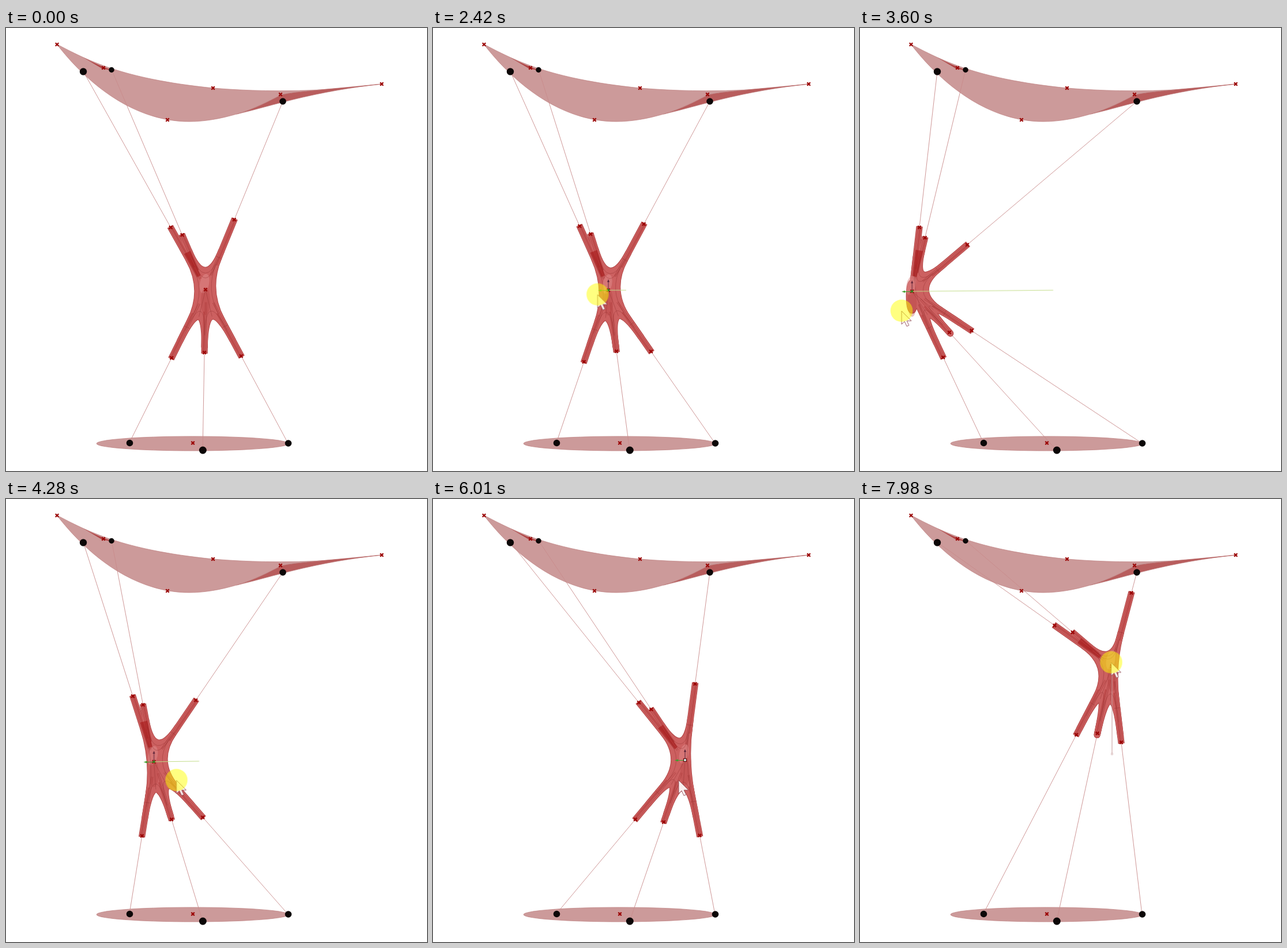
Animation, 730 px wide and 767 px high, one loop 8000 ms. Source, as an HTML page without scripts:

```html
<!DOCTYPE html>
<html lang="en">
<head>
<meta charset="utf-8">
<title>Branching node</title>
<style>
@property --cx { syntax: "<number>"; inherits: true; initial-value: 346; }
@property --cy { syntax: "<number>"; inherits: true; initial-value: 453; }

html, body { margin: 0; width: 100%; height: 100%; overflow: hidden; background: #fff; }
svg { display: block; width: 730px; height: 767px; animation: drag 8s linear infinite; }
path { vector-effect: non-scaling-stroke; }

/* Position of the draggable centre */
@keyframes drag {
  0%, 21.6% { --cx: 346; --cy: 453; }
  31.1% { --cx: 300; --cy: 454; }
  36.25% { --cx: 219; --cy: 455; }
  41% { --cx: 92; --cy: 456; }
  48% { --cx: 89; --cy: 456; }
  51.75% { --cx: 135; --cy: 456; }
  53.5% { --cx: 256; --cy: 455; }
  57% { --cx: 410; --cy: 452; }
  64% { --cx: 482; --cy: 451; }
  66.5% { --cx: 488; --cy: 451; }
  69% { --cx: 474; --cy: 451; }
  73.4%, 85% { --cx: 437; --cy: 452; }
  90% { --cx: 437; --cy: 405; }
  95% { --cx: 437; --cy: 335; }
  100% { --cx: 437; --cy: 287; }
}

/* Anchors: place, limb length and how it varies with the centre */
.tl { --x: 134; --y: 75;  --n: 123.5; --kx: .047; --ky: .036; }
.tm { --x: 183; --y: 72;  --n: 103;   --kx: .03;  --ky: .097; }
.tr { --x: 480; --y: 127; --n: 131;   --kx: .023; --ky: .012; }
.bl { --x: 214; --y: 718; --n: 132;   --kx: .022; --ky: 0; }
.bm { --x: 341; --y: 731; --n: 109;   --kx: .05;  --ky: -.035; }
.br { --x: 489; --y: 719; --n: 130.6; --kx: .027; --ky: 0; }

.p {
  --dx: calc(var(--x) - var(--cx));
  --dy: calc(var(--y) - var(--cy));
  --ux: cos(atan2(var(--dy), var(--dx)));
  --uy: sin(atan2(var(--dy), var(--dx)));
  --l: calc(var(--n) + var(--kx) * (var(--cx) - 346) + var(--ky) * (var(--cy) - 453));
}
.string {
  transform: matrix(var(--dx), var(--dy), calc(0 - var(--dy)), var(--dx), var(--cx), var(--cy));
  fill: none; stroke: #c98c8c; stroke-width: .9;
}
.limb {
  transform: matrix(calc(var(--l) * var(--ux)), calc(var(--l) * var(--uy)),
    calc(0 - var(--uy)), var(--ux), var(--cx), var(--cy));
  fill: none;
}
.end {
  transform: translate(calc((var(--cx) + var(--l) * var(--ux)) * 1px),
    calc((var(--cy) + var(--l) * var(--uy)) * 1px));
}
/* Skin between two limbs, curved towards the centre */
.web {
  --vx: cos(atan2(var(--y2) - var(--cy), var(--x2) - var(--cx)));
  --vy: sin(atan2(var(--y2) - var(--cy), var(--x2) - var(--cx)));
  --r: calc(var(--t) + var(--kt, 0) * (var(--cy) - 453));
  transform: matrix(calc(var(--r) * var(--ux)), calc(var(--r) * var(--uy)),
    calc(var(--r) * var(--vx)), calc(var(--r) * var(--vy)), var(--cx), var(--cy));
}
.top { --t: 73; --kt: .13; }
.side { --t: 60; }
.low { --t: 99; --kt: -.14; }
.core { transform: translate(calc(var(--cx) * 1px), calc(var(--cy) * 1px)); }

.rim { --w: 11.2px; color: #ad4040; }
.skin { --w: 9.6px; color: #cc6060; }
.rim, .skin { stroke: currentColor; fill: currentColor; stroke-width: var(--w); stroke-linejoin: round; }
.seam { stroke: #a63636; stroke-width: .7; }
.shade { stroke: #bd4a4a; stroke-width: 2.6; }
.mesh { fill: none; stroke: #8e2c2c; stroke-width: .6; opacity: .65; }
.fold { fill: #a30c0c; stroke: #a30c0c; stroke-width: 4; opacity: .5; }
.x { stroke: #9b0505; stroke-width: 2.3; fill: none; }
.ball { fill: #0c0707; }

.axis {
  transform: matrix(calc(var(--cx) - 335), calc(var(--cy) - 454),
    calc(454 - var(--cy)), calc(var(--cx) - 335), 335, 454);
  stroke: #c3dc8a; animation: sideways 8s step-end infinite;
}
.lift {
  transform: matrix(1, 0, 0, calc(441 - var(--cy)), 437, var(--cy));
  stroke: #c59a9a;
}
.rise { animation: upward 8s step-end infinite; }
.gumball { animation: picked 8s step-end infinite; }
.rest { animation: idle 8s step-end infinite; }
.halo { fill: #ff0; opacity: .5; animation: press 8s step-end infinite; }
.cursor { animation: point 8s linear infinite; }
.arrow { fill: #fff; fill-opacity: .9; stroke: #8f4650; stroke-width: .9; }

@keyframes sideways { 0% { opacity: 0; } 21.6% { opacity: 1; } 73.4% { opacity: 0; } }
@keyframes upward { 0% { opacity: 0; } 85% { opacity: 1; } }
@keyframes picked { 0% { opacity: 0; } 20% { opacity: 1; } 85% { opacity: 0; } }
@keyframes idle { 0% { opacity: 0; } 20% { opacity: 1; } 21.6% { opacity: 0; } 73.4% { opacity: 1; } 85% { opacity: 0; } }
@keyframes press { 0% { opacity: 0; } 21.6% { opacity: .5; } 73.4% { opacity: 0; } 84.5% { opacity: .5; } }
@keyframes point {
  0%, 10.86% { transform: translate(426px, 398px); opacity: 0; }
  10.87% { transform: translate(426px, 398px); opacity: 1; }
  20.5%, 21.6% { transform: translate(336px, 450px); }
  30.5% { transform: translate(284px, 462px); }
  36.25% { transform: translate(184px, 474px); }
  40.5% { transform: translate(74px, 490px); }
  47.5% { transform: translate(71px, 490px); }
  51.2% { transform: translate(135px, 489px); }
  53.5% { transform: translate(295px, 487px); }
  56.5% { transform: translate(415px, 490px); }
  64% { transform: translate(476px, 491px); }
  66% { transform: translate(479px, 491px); }
  68.5% { transform: translate(464px, 489px); }
  73.4%, 75.5% { transform: translate(426px, 487px); }
  82%, 84.5% { transform: translate(436px, 444px); }
  90% { transform: translate(436px, 398px); }
  95% { transform: translate(436px, 328px); }
  100% { transform: translate(435.5px, 281px); opacity: 1; }
}
</style>
</head>
<body>
<svg viewBox="0 0 730 767">
  <defs>
    <path id="x" class="x" d="M-2.7-2.7 2.7 2.7M-2.7 2.7 2.7-2.7"/>
    <g id="body">
      <path class="p limb tl" d="M0 0H1.015"/>
      <path class="p limb tm" d="M0 0H1.015"/>
      <path class="p limb tr" d="M0 0H1.015"/>
      <path class="p limb bl" d="M0 0H1.015"/>
      <path class="p limb bm" d="M0 0H1.015"/>
      <path class="p limb br" d="M0 0H1.015"/>
      <path class="p web tr top" style="--x2:183;--y2:72" d="M0 0H1Q0 0 0 1z"/>
      <path class="p web tl side" style="--x2:214;--y2:718" d="M0 0H1Q0 0 0 1z"/>
      <path class="p web tr side" style="--x2:489;--y2:719" d="M0 0H1Q0 0 0 1z"/>
      <path class="p web bl low" style="--x2:341;--y2:731" d="M0 0H1Q0 0 0 1z"/>
      <path class="p web bm low" style="--x2:489;--y2:719" d="M0 0H1Q0 0 0 1z"/>
      <ellipse class="core" cy="9" rx="5" ry="24"/>
    </g>
    <g id="lines">
      <path class="shade" d="M.35 2H1"/>
      <path class="seam" d="M.2-2.4H1M.2 0H1M1-5V5"/>
    </g>
  </defs>

  <!-- canopy and base -->
  <g stroke="#bd7f7f" stroke-width=".7">
    <path fill="#b85d5d" d="M400 149C455 137 525 111 651 97L545 107C510 110 490 112 476 116C455 127 430 140 400 149z"/>
    <path fill="#cc9a9a" d="M88 28C140 55 200 88 359 104C420 109 480 110 545 107C510 110 490 112 476 116C455 127 430 140 400 149C372 157 345 162 318 162C220 162 140 95 88 28z"/>
    <path fill="none" stroke="#b85d5d" d="M545 107Q600 104 651 97"/>
    <path fill="#b04444" stroke="none" d="M134 51Q160 65 190 75L166 70z"/>
    <ellipse fill="#cc9a9a" cx="323.5" cy="719.5" rx="166.5" ry="12.5"/>
  </g>

  <path class="p string tl" d="M0 0H1"/>
  <path class="p string tm" d="M0 0H1"/>
  <path class="p string tr" d="M0 0H1"/>
  <path class="p string bl" d="M0 0H1"/>
  <path class="p string bm" d="M0 0H1"/>
  <path class="p string br" d="M0 0H1"/>

  <g class="ball">
    <circle cx="134" cy="75.5" r="6.2"/>
    <circle cx="183" cy="72.5" r="4.7"/>
    <circle cx="480" cy="127" r="5.8"/>
    <circle cx="214.5" cy="718.5" r="5.8"/>
    <circle cx="341.3" cy="731" r="6.5"/>
    <circle cx="489.5" cy="719" r="5.8"/>
  </g>
  <use href="#x" x="88.5" y="28.5"/>
  <use href="#x" x="169" y="69"/>
  <use href="#x" x="359" y="104"/>
  <use href="#x" x="280" y="159"/>
  <use href="#x" x="476" y="115"/>
  <use href="#x" x="651.5" y="97"/>
  <use href="#x" x="324" y="718.5"/>

  <!-- node -->
  <use href="#body" class="rim"/>
  <use href="#body" class="skin"/>
  <use href="#lines" class="p limb tl"/>
  <use href="#lines" class="p limb tm"/>
  <use href="#lines" class="p limb tr"/>
  <use href="#lines" class="p limb bl"/>
  <use href="#lines" class="p limb bm"/>
  <use href="#lines" class="p limb br"/>
  <g class="core">
    <ellipse cx="-4" cy="-10" rx="8" ry="17" transform="rotate(12)" fill="#e08c8c" opacity=".5"/>
    <ellipse cy="20" rx="8" ry="24" fill="#b23c3c" opacity=".3"/>
  </g>
  <path class="p web tl fold" style="--x2:183;--y2:72;--t:70" d="M.4 0H1L0 1V.4z"/>
  <g class="mesh">
    <path class="p web tr top" style="--x2:183;--y2:72" d="M.85 0Q0 0 0 .85M.6 0Q0 0 0 .6"/>
    <path class="p web tl side" style="--x2:214;--y2:718" d="M.8 0Q0 0 0 .8"/>
    <path class="p web tr side" style="--x2:489;--y2:719" d="M.8 0Q0 0 0 .8"/>
    <path class="p web bl low" style="--x2:341;--y2:731" d="M.8 0Q0 0 0 .8M0 0 .25.25"/>
    <path class="p web bm low" style="--x2:489;--y2:719" d="M.8 0Q0 0 0 .8M0 0 .25.25"/>
    <path class="p limb tr" d="M.46-5V5"/>
    <path class="p limb bl" d="M.55-5V5"/>
    <path class="p limb br" d="M.55-5V5"/>
  </g>
  <g class="p end tl"><use href="#x"/></g>
  <g class="p end tm"><use href="#x"/></g>
  <g class="p end tr"><use href="#x"/></g>
  <g class="p end bl"><use href="#x"/></g>
  <g class="p end bm"><use href="#x"/></g>
  <g class="p end br"><use href="#x"/></g>
  <g class="core"><use href="#x"/></g>

  <!-- handles -->
  <path class="axis" d="M0 0H1"/>
  <g class="rise">
    <path class="lift" d="M0 0V1"/>
    <circle cx="437" cy="441.5" r="1.5" fill="#fff" stroke="#c59a9a" stroke-width=".8"/>
  </g>
  <g class="core">
    <g class="gumball">
      <path d="M0 0V-16" stroke="#5b2338"/>
      <path d="M-2-14 0-19 2-14z" fill="#5b2338"/>
      <path d="M-2 .5H-14" stroke="#3f9f2c"/>
      <path d="M-12-1.5-18 .5-12 2.5z" fill="#3f9f2c"/>
      <rect x="-2" y="-2" width="4" height="4" fill="#3a7d22"/>
      <g class="rest">
        <circle r="2.4" fill="#fff" stroke="#222"/>
      </g>
    </g>
  </g>

  <g class="cursor">
    <path class="arrow" d="M0 0V23L5.2 18.2 9 26.5 12.8 24.8 9.2 17H17z"/>
    <circle class="halo" cy="-.5" r="19.3"/>
  </g>
</svg>
</body>
</html>
```
